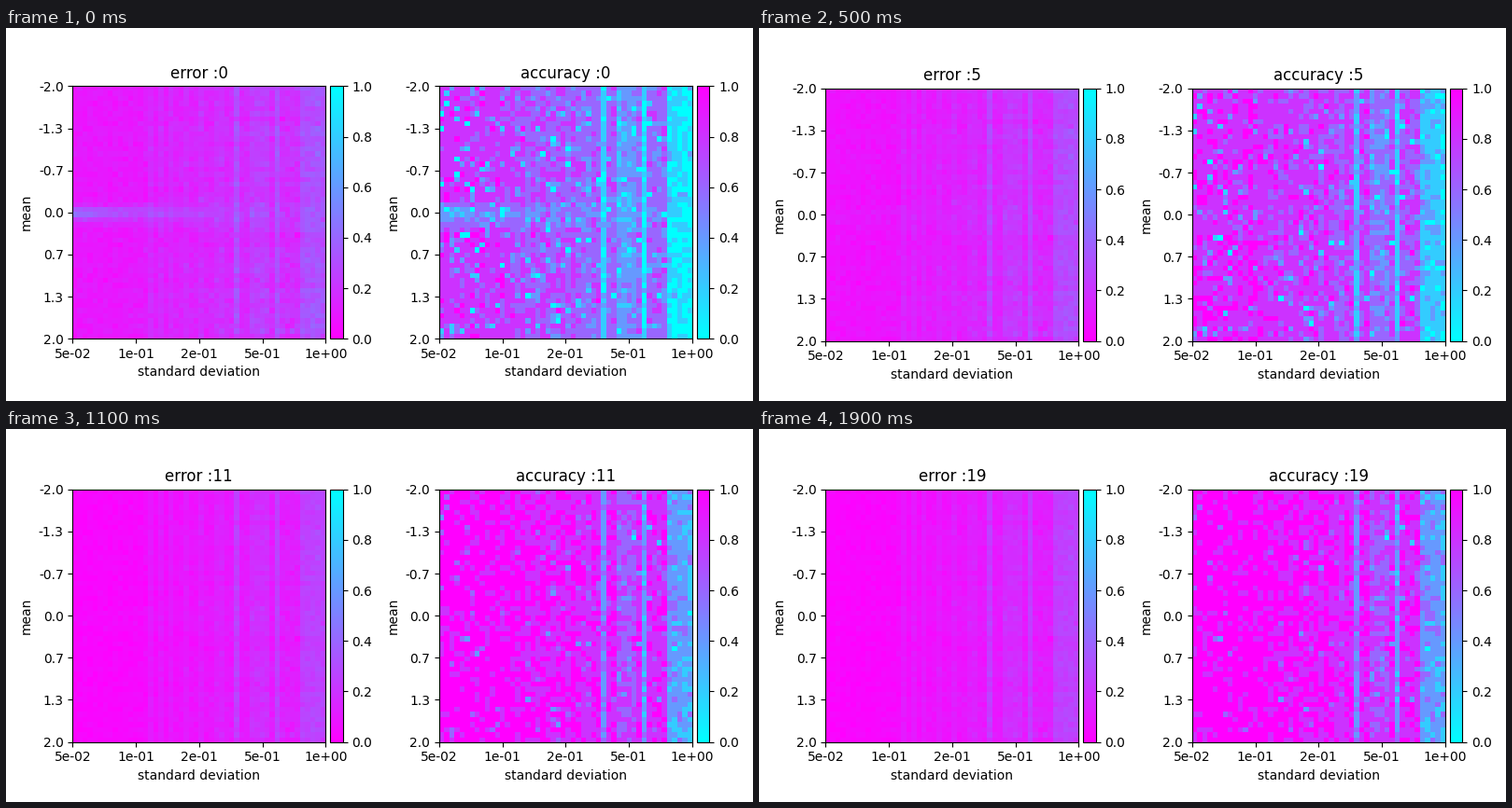
A matplotlib script for the animation above (2 s loop, 800 px wide and 400 px high).

```python
import numpy as np
import matplotlib.pyplot as plt
from matplotlib.animation import FuncAnimation

W, H, DPI = 800, 400, 100
N, FRAMES = 50, 20
SIDE, PAD = 270.8, 5
BAR = SIDE * .05

cols = np.arange(N)
rows = np.arange(N)[:, None]
rng = np.random.default_rng(7)

# How hard each noise level is: a rising trend plus a few unlucky columns.
hard = np.interp(cols, [0, 12, 26, 34, 44, 45, 49],
                 [0, .02, .15, .22, .3, .9, .97])
for group, extra in (((15, 17, 19, 22, 25, 28, 29), .15),
                     ((35, 36, 37, 38), .3),
                     ((32, 40), .65)):
    hard[list(group)] += extra

jitter = rng.normal(size=(N, N)) * (.07 + .0008 * cols)
missed = rng.random((N, N)) < .26 * (1 - hard)
drops = missed * rng.exponential(.28, (N, N))
err_noise = (rng.normal(size=(N, N)) * (.018 + .0003 * cols)
             + rng.normal(size=(N, 1)) * .02 * cols / N)


def bump(center, width, reach):
    return np.exp(-((rows - center) / width) ** 2 - cols / reach)


# Slow start around mean 0 for small deviations.
core, halo = bump(24.6, 1, 14), bump(25, 2, 28)


def fields(t):
    w = 1 / (1 + np.exp(-(t - np.where(cols < 11, 6.3, 5.5)) / 2))
    fade = (1 + t) ** -1.2
    before, after = .8 - .75 * hard, 1 - .65 * hard ** 1.3
    acc = before + (after - before) * w + jitter
    acc = acc - drops * (1 - .6 * w) - .42 * fade * halo
    err = .09 - .075 * w + .25 * hard ** .7
    err = err + err_noise * (1 - .4 * w) + fade * (.25 * core + .13 * halo)
    return np.clip(err, 0, 1), np.round(np.clip(acc, 0, 1) * 5) / 5


def box(x, y, w):
    return [x / W, y / H, w / W, SIDE / H]


class Panel:
    def __init__(self, name, x, cmap):
        self.name, self.x = name, x
        self.ax = fig.add_axes(box(x, 0, SIDE))
        self.cax = fig.add_axes(box(x + SIDE + PAD, 0, BAR))
        self.im = self.ax.imshow(np.zeros((N, N)), cmap=cmap, vmin=0, vmax=1,
                                 extent=(0, N, N, 0), aspect="auto",
                                 interpolation="nearest")
        fig.colorbar(self.im, cax=self.cax)
        self.ax.set_xticks(np.linspace(0, N, 5),
                           ["5e-02", "1e-01", "2e-01", "5e-01", "1e+00"])
        self.ax.set_yticks(np.linspace(0, N, 7),
                           [f"{v:.1f}" for v in np.linspace(-2, 2, 7)])
        self.ax.set_xlabel("standard deviation")
        self.ax.set_ylabel("mean")

    def show(self, t, data):
        # The layout settles a little lower after the first step.
        y = 66.8 if t == 0 else 64.4
        self.ax.set_position(box(self.x, y, SIDE))
        self.cax.set_position(box(self.x + SIDE + PAD, y, BAR))
        self.im.set_data(data)
        self.ax.set_title(f"{self.name} :{t}")


fig = plt.figure(figsize=(W / DPI, H / DPI), dpi=DPI, facecolor="white")
panels = [Panel("error", 71.4, "cool_r"), Panel("accuracy", 463.9, "cool")]


def update(t):
    for panel, data in zip(panels, fields(t)):
        panel.show(t, data)
    return []


anim = FuncAnimation(fig, update, frames=FRAMES, interval=100,
                     init_func=lambda: update(0), repeat=True, repeat_delay=0)
plt.show()
```
